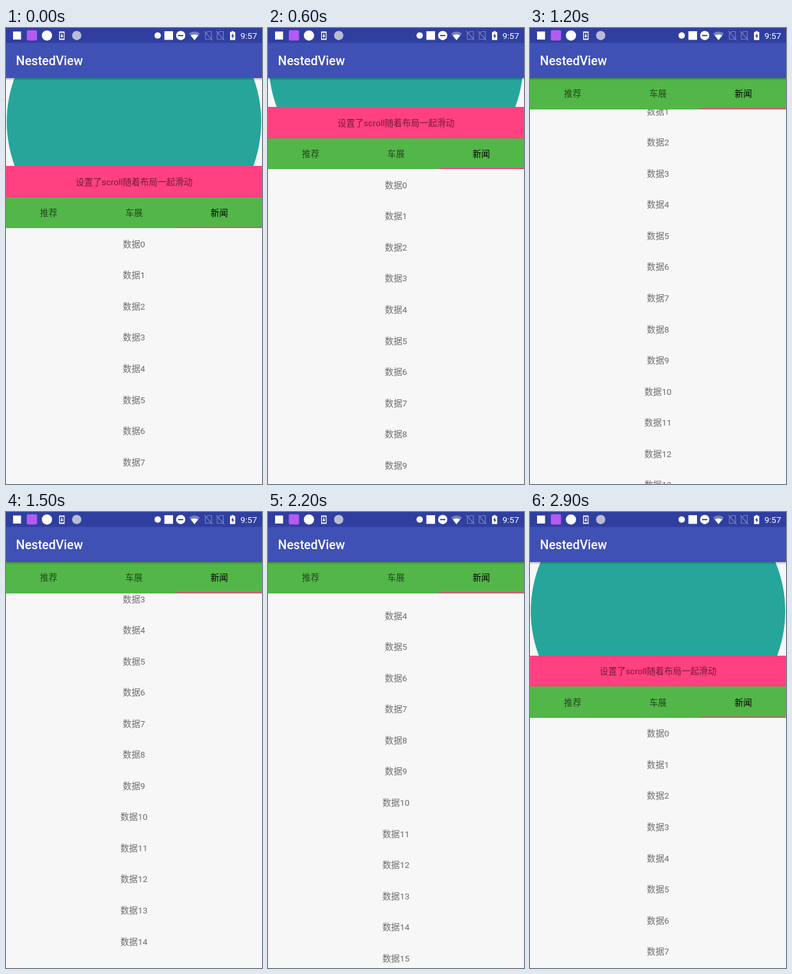
An HTML page with a canvas that plays this animation: 400 by 711 pixels, repeating every 3000 ms.

```html
<!DOCTYPE html>
<html lang="zh-CN">
<head>
<meta charset="utf-8">
<style>
  html, body { margin: 0; width: 400px; height: 711px; overflow: hidden; background: #f8f7f8; }
  canvas { display: block; }
</style>
</head>
<body>
<canvas id="stage" width="400" height="711"></canvas>
<script>
const ctx = document.getElementById('stage').getContext('2d');
const FONT = 'Roboto, "Noto Sans CJK SC", "Noto Sans CJK", sans-serif';
const LOOP = 3000, STEP = 100, ROW = 48.53, BAR_BOTTOM = 78, PAGE = '#f8f7f8';

// Scroll distance at a few times; smooth monotone curve between them.
const keys = [[0, 0], [200, 42], [600, 92], [1200, 255.6], [1900, 423.7], [2600, 204], [2900, -8.5]];
const slopes = keys.slice(1).map(([t, y], i) => (y - keys[i][1]) / (t - keys[i][0]));
const tangents = keys.map((_, i) => {
  const a = slopes[i - 1] || 0, b = slopes[i] || 0;
  return a * b > 0 ? 2 * a * b / (a + b) : 0;
});

function scrollAt(time) {
  let i = 0;
  while (i < keys.length - 2 && time > keys[i + 1][0]) i++;
  const [t0, y0] = keys[i], [t1, y1] = keys[i + 1];
  const h = t1 - t0, u = (time - t0) / h, v = 1 - u;
  return v * v * (1 + 2 * u) * y0 + u * v * v * h * tangents[i]
       + u * u * (3 - 2 * u) * y1 - u * u * v * h * tangents[i + 1];
}

function rect(x, y, w, h, color) {
  ctx.fillStyle = color;
  ctx.fillRect(x, y, w, h);
}

// Full-width band with its edges on whole pixels, so neighbours meet without a seam.
function band(top, bottom, color) {
  const y = Math.round(top);
  rect(0, y, 400, Math.round(bottom) - y, color);
}

function circle(x, y, r, color) {
  ctx.fillStyle = color;
  ctx.beginPath();
  ctx.arc(x, y, r, 0, Math.PI * 2);
  ctx.fill();
}

function shape(path, color) {
  ctx.fillStyle = color;
  ctx.fill(new Path2D(path));
}

function text(label, x, y, color, size = 13.6, align = 'center', weight = 400) {
  ctx.font = `${weight} ${size}px ${FONT}`;
  ctx.textAlign = align;
  ctx.fillStyle = color;
  ctx.fillText(label, x, y);
}

function drawStatusBar() {
  rect(0, 0, 400, 23.3, '#303f9f');
  rect(11, 5.5, 12.5, 12.5, '#fff');
  ctx.fillStyle = '#b45af2';
  ctx.beginPath();
  ctx.roundRect(32.5, 3.5, 16, 16, 2);
  ctx.fill();
  circle(64, 11.7, 8, '#fff');

  // Phone with download arrow
  rect(83, 5.5, 8.5, 13, '#fff');
  rect(84.2, 7.5, 6.1, 9, '#303f9f');
  shape('M86.5 9h1.5v3h1.8l-2.6 3-2.6-3h1.9z', '#fff');

  circle(110.5, 11.7, 7.2, '#b9bcd6');
  circle(237, 11.7, 5, '#fff');
  rect(247.5, 5, 13.5, 13.5, '#fff');

  // Do not disturb
  circle(273, 11.7, 7.2, '#fff');
  rect(269, 10.8, 8, 1.9, '#303f9f');

  // Wi-Fi
  shape('M286 8.5Q294.5 2.5 303 8.5L294.5 19z', '#7580bf');
  shape('M288.5 11.6Q294.5 8.5 300.5 11.6L294.5 19z', '#fff');

  // Missing SIM cards
  ctx.strokeStyle = '#7580bf';
  ctx.lineWidth = 1.2;
  for (const x of [310.5, 329]) {
    ctx.stroke(new Path2D(`M${x + 1} 9L${x + 5} 5.5H${x + 10.5}V17.5H${x + 1}zM${x - 0.5} 5L${x + 12} 19`));
  }

  // Charging battery
  shape('M350 6.3h2.5V4.8h3.2v1.5h2.5V18.7h-8.2z', '#fff');
  shape('M354.8 8l-3 5h1.9v3.8l3-5h-1.9z', '#303f9f');

  text('9:57', 392.4, 17, '#fff', 13.6, 'right');
}

function drawAppBar() {
  const shadow = ctx.createLinearGradient(0, BAR_BOTTOM, 0, BAR_BOTTOM + 4);
  shadow.addColorStop(0, 'rgba(0,0,0,.25)');
  shadow.addColorStop(1, 'rgba(0,0,0,0)');
  rect(0, BAR_BOTTOM, 400, 4, shadow);
  rect(0, 0, 400, BAR_BOTTOM, '#3f51b5');
  text('NestedView', 15.6, 58, '#fff', 19.44, 'left', 500);
  drawStatusBar();
}

function drawTabs(y) {
  const bottom = Math.round(y + ROW);
  band(y, bottom, '#53b649');
  ['推荐', '车展', '新闻'].forEach((label, i) => {
    text(label, 66.7 + i * 133.3, y + 29.3, i === 2 ? '#000' : 'rgba(0,0,0,.6)');
  });
  rect(266.7, bottom - 2, 133.3, 2, '#e2507a');
}

function drawList(y, tabY) {
  band(tabY, 711, PAGE);
  for (let i = 0; i < 20; i++) {
    text('数据' + i, 200, y + i * ROW + 4.9, 'rgba(0,0,0,.56)');
  }
}

function draw(scroll) {
  const bannerY = 215.2 - scroll;
  const tabY = Math.max(BAR_BOTTOM, bannerY + ROW);
  band(0, 711, PAGE);
  circle(200, 146 - scroll, 198.8, '#26a69a');
  drawList(337 - scroll, tabY);
  band(bannerY, bannerY + ROW, '#ff4081');
  text('设置了scroll随着布局一起滑动', 200, bannerY + 29.5, 'rgba(0,0,0,.56)');
  drawTabs(tabY);
  drawAppBar();
}

const start = performance.now();
function tick() {
  const time = (performance.now() - start) % LOOP;
  draw(scrollAt(Math.floor(time / STEP) * STEP));
  requestAnimationFrame(tick);
}
tick();
</script>
</body>
</html>
```
